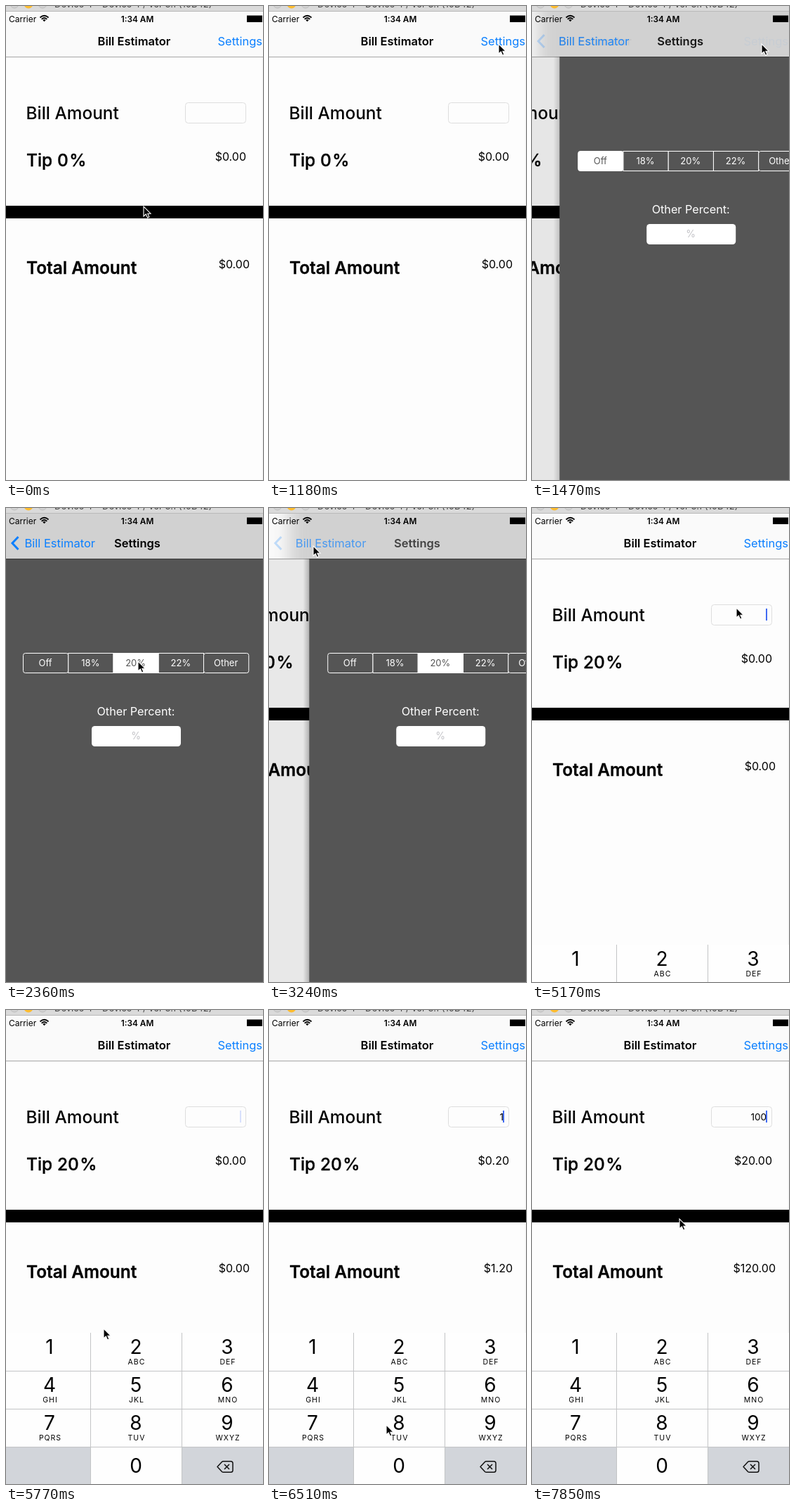
An HTML page that plays this animation: 366 by 674 pixels, repeating every 8 s.

```html
<!DOCTYPE html>
<html lang="en">
<head>
<meta charset="utf-8">
<title>Bill splitter</title>
<style>
  html, body { margin: 0; width: 100%; height: 100%; overflow: hidden; background: #fefefe; }
  svg { display: block; width: 100vw; height: 100vh; font-family: Inter, Roboto, sans-serif; }
  .mid { text-anchor: middle; }
  .end { text-anchor: end; }
  .head { font-size: 24.4px; font-weight: 500; }
  .bold { font-weight: 600; }
  .heavy { stroke: #000; stroke-width: .3; }
  .nav { font-size: 16.5px; }
  .money { font-size: 16px; }
  .blue { fill: #0a7fff; }
</style>
</head>
<body>
<svg viewBox="0 0 366 674" xmlns="http://www.w3.org/2000/svg">
  <defs>
    <linearGradient id="fade"><stop offset="0" stop-opacity="0"/><stop offset="1" stop-opacity=".24"/></linearGradient>
    <filter id="soft" x="-20%" width="140%" y="-100%" height="300%"><feGaussianBlur stdDeviation="12 0"/></filter>
    <clipPath id="navClip"><rect y="8" width="366" height="64"/></clipPath>
  </defs>

  <g id="home">
    <rect x="-2" y="72" width="375" height="602" fill="#fdfdfd"/>
    <text class="head" x="28.5" y="161">Bill Amount</text>
    <rect x="255.5" y="137.5" width="86" height="29" rx="4" fill="#fdfdfd" stroke="#dedede"/>
    <text id="bill" class="end" x="334" y="157" font-size="13.5"></text>
    <rect id="caret" x="333" y="143" width="2" height="17" fill="#426bf2"/>
    <g class="head heavy">
      <text x="29" y="228">Tip</text>
      <text x="73" y="228"><tspan id="rate">0</tspan><tspan dx="1.5">%</tspan></text>
    </g>
    <text id="tip" class="money end" x="342" y="220"></text>
    <rect x="-2" y="284" width="375" height="18"/>
    <text class="head bold heavy" x="29" y="381">Total Amount</text>
    <text id="total" class="money end" x="347" y="373"></text>
    <rect id="dim" x="-2" y="72" width="375" height="602"/>
  </g>

  <g id="settings">
    <rect id="shadow" x="-9" y="72" width="9" height="602" fill="url(#fade)"/>
    <rect y="72" width="377" height="602" fill="#555"/>
    <g id="segments" font-size="13"></g>
    <text class="mid" x="187" y="295" font-size="16.2" fill="#fff">Other Percent:</text>
    <rect x="124" y="310" width="127" height="29" rx="4.5" fill="#fff"/>
    <text class="mid" x="187" y="329" font-size="14" fill="#c4c4c8">%</text>
  </g>

  <g id="keypad"></g>

  <rect y="8" width="366" height="64" fill="#fafafa"/>
  <g clip-path="url(#navClip)"><rect id="navShade" y="0" width="480" height="80" fill="#d1d1d1" filter="url(#soft)"/></g>
  <rect y="72" width="366" height="1" opacity=".34"/>
  <path id="chevron" d="M17.5 41L9 50l8.5 9" fill="none" stroke="#0a7fff" stroke-width="3"/>
  <g id="back" class="nav">
    <text id="backBlue" class="blue" y="56">Bill Estimator</text>
    <text id="homeTitle" class="bold" y="56">Bill Estimator</text>
  </g>
  <text id="setTitle" class="nav bold mid" y="56">Settings</text>
  <text id="setButton" class="nav blue" x="301.5" y="56">Settings</text>

  <text x="4" y="22.5" font-size="12">Carrier</text>
  <path d="M48.5 16.5Q54.5 11 60.5 16.5M50.7 18.8Q54.5 15.3 58.3 18.8" fill="none" stroke="#000" stroke-width="1.8"/>
  <path d="M52.3 20L54.5 22.3 56.7 20Q54.5 18.2 52.3 20z"/>
  <text class="bold mid" x="187" y="22.5" font-size="11.8">1:34 AM</text>
  <rect x="343" y="13.5" width="22" height="9.5"/>

  <rect width="366" height="8" fill="#dadada"/>
  <rect y="7" width="366" height="1" fill="#b9b9b9"/>
  <g stroke="#bdbdbd"><circle cx="12" cy="-3" r="6" fill="#d2d2d2"/><circle cx="52" cy="-3" r="6" fill="#d2d2d2"/></g>
  <circle cx="32" cy="-3" r="6.5" fill="#fdbc2e"/>
  <text x="69" y="2" font-size="13" fill="#444">Device 4 – Device 4 / ver 3.1 (10B42)</text>

  <path id="pointer" d="M0 0V14L3.3 11 5.5 16 7.9 15 5.8 10.2H10z" stroke="#fff" stroke-width="1.1"/>
</svg>

<script>
const LOOP = 8000, STEP = 148, LEAD = 22;
const PUSH = 8.04, POP = 21.633, PICK = 16, FOCUS = 34.5;
const $ = id => document.getElementById(id);
const attr = (id, name, value) => $(id).setAttribute(name, value);
const move = (id, x, y = 0) => attr(id, 'transform', `translate(${x} ${y})`);

// pointer stops: step, x, y
const route = [
  [3, 196, 285], [7, 327, 54], [12, 327, 54], [16, 188, 218], [17, 188, 218],
  [20, 63, 54], [22, 63, 54], [26, 327, 161], [27, 312, 152], [30, 299, 149],
  [31, 299, 149], [33, 291, 142], [35, 291, 142], [39, 139, 453], [41, 64, 484],
  [42, 64, 484], [44, 167, 590], [46, 190, 646], [50, 190, 646], [53, 210, 297]
];

// value of the bill field from each step on
const typed = [[42, 1], [47, 10], [50, 100]];
const presses = { 1: [[41, 42]], 0: [[46, 47], [49, 50]] };

function buildSegments() {
  const w = 64.25;
  $('segments').innerHTML = ['Off', '18%', '20%', '22%', 'Other'].map((label, i) =>
    `<rect x="${26.5 + i * w}" y="206.5" width="${w}" height="28" rx="${i % 4 ? 0 : 3}" stroke="#fff"/>
     <text class="mid" x="${26 + (i + .5) * w}" y="225">${label}</text>`).join('');
}

function buildKeypad() {
  const edges = [0, 120.5, 250.5, 368], centers = [62, 185, 315];
  const letters = ['', 'ABC', 'DEF', 'GHI', 'JKL', 'MNO', 'PQRS', 'TUV', 'WXYZ'];
  const cell = (col, row, fill, id) =>
    `<rect ${id ? `id="${id}"` : ''} x="${edges[col]}" y="${459 + row * 54}" width="${edges[col + 1] - edges[col]}" height="54" fill="${fill}"/>`;
  const digit = (n, x, y) => `<text class="mid" x="${x}" y="${y}" font-size="28">${n}</text>`;
  let out = '';
  letters.forEach((word, i) => {
    const col = i % 3, row = Math.floor(i / 3), x = centers[col], y = 459 + row * 54;
    out += cell(col, row, '#fefefe', 'key' + (i + 1)) + digit(i + 1, x, y + 30) +
      `<text class="mid" x="${x + 1}" y="${y + 45}" font-size="10.5" letter-spacing="1">${word}</text>`;
  });
  out += cell(0, 3, '#d2d5da') + cell(1, 3, '#fefefe', 'key0') + cell(2, 3, '#d2d5da') + digit(0, 185, 658);
  out += '<path d="M0 513.5H366M0 567.5H366M0 621.5H366M120.5 459V674M250.5 459V674" stroke="#c3c4c6"/>';
  out += `<g fill="none" stroke="#111" stroke-width="1.5" stroke-linejoin="round">
    <path d="M301 649.5L307.5 642.5Q308.3 641.7 309.5 641.7H320Q323 641.7 323 644.5V654.5Q323 657.3 320 657.3H309.5Q308.3 657.3 307.5 656.5z"/>
    <path d="M311 646L318 653M318 646L311 653"/></g>`;
  $('keypad').innerHTML = out;
}

// share of a spring movement still to go
function remaining(step, start) {
  if (step <= start) return 1;
  const x = (step - start) * 1.924, r = (1 + x) * Math.exp(-x);
  return r < .002 ? 0 : r;
}

function pointerAt(step) {
  const next = route.findIndex(stop => stop[0] >= step);
  if (next < 1) return route[0].slice(1);
  const [s0, x0, y0] = route[next - 1], [s1, x1, y1] = route[next];
  const k = (step - s0) / (s1 - s0);
  return [x0 + (x1 - x0) * k, y0 + (y1 - y0) * k];
}

function drawScreens(step) {
  const popping = step > POP;
  const off = popping ? 1 - remaining(step, POP) : remaining(step, PUSH);
  move('settings', -2 + 375 * off);
  move('home', -112.5 * (1 - off));
  attr('dim', 'opacity', .1 * (1 - off));
  attr('shadow', 'opacity', Math.min(1, off * 6));
  attr('navShade', 'x', off === 1 ? 500 : -40 + 430 * off);

  const slide = popping ? off ** 1.2 : off;
  const shown = popping ? Math.max(0, 1 - 2 * off) : 1 - off;
  const homeShown = popping ? Math.max(0, 2 * off - 1) : off ** 1.4;
  move('back', 26.5 + 104 * slide);
  attr('setTitle', 'x', 187 + 220 * slide);
  attr('setTitle', 'opacity', shown);
  attr('backBlue', 'opacity', shown);
  attr('homeTitle', 'opacity', homeShown);
  attr('setButton', 'opacity', homeShown);
  attr('chevron', 'opacity', Math.max(0, 1 - 7 * slide));

  const chosen = step >= PICK ? 2 : 0;
  $('segments').querySelectorAll('rect').forEach((r, i) => r.setAttribute('fill', i === chosen ? '#fff' : '#555'));
  $('segments').querySelectorAll('text').forEach((t, i) => t.setAttribute('fill', i === chosen ? '#555' : '#fff'));
  $('rate').textContent = popping ? 20 : 0;
}

function drawBill(step) {
  const entry = typed.filter(([from]) => step >= from).pop();
  const bill = entry ? entry[1] : 0;
  $('bill').textContent = bill || '';
  $('tip').textContent = '$' + (bill * .2).toFixed(2);
  $('total').textContent = '$' + (bill * 1.2).toFixed(2);

  const age = (step - (entry ? entry[0] : 35)) * STEP % 1000;
  const blink = age < 500 ? 1 : age < 620 ? .2 : age < 850 ? 0 : .8;
  attr('caret', 'opacity', step > FOCUS ? blink : 0);

  move('keypad', 0, 216 * remaining(step, FOCUS));
  for (const key in presses) {
    const down = presses[key].some(([a, b]) => step >= a && step <= b);
    attr('key' + key, 'fill', down ? '#d2d5da' : '#fefefe');
  }
}

let last = -1;
function frame(now) {
  const step = Math.min(53, Math.floor((now % LOOP + LEAD) / STEP));
  if (step !== last) {
    last = step;
    drawScreens(step);
    drawBill(step);
    move('pointer', ...pointerAt(step));
  }
  requestAnimationFrame(frame);
}

buildSegments();
buildKeypad();
frame(0);
</script>
</body>
</html>
```
